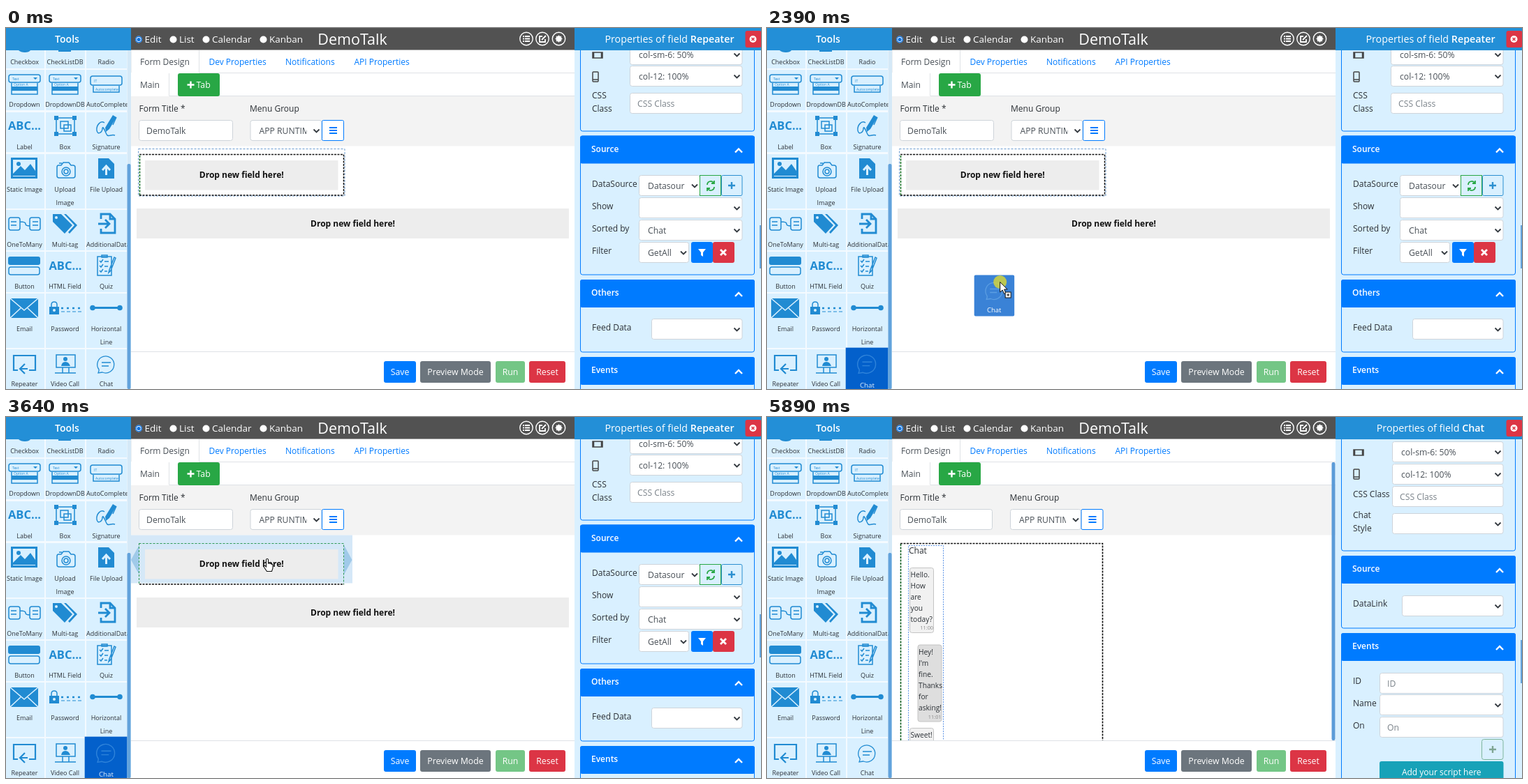
Animation of 1081 by 518 pixels, one loop 6280 ms. Source, as an HTML page:

```html
<!DOCTYPE html>
<html lang="en">
<head>
<meta charset="utf-8">
<title>Form designer</title>
<style>
html, body { margin: 0; width: 100%; height: 100%; overflow: hidden; background: #fff; }
#stage { display: block; width: 1081px; height: 518px; font: 12px "Open Sans", "Noto Sans", sans-serif; fill: #2b3035; }
text { white-space: pre; }
.tile .ink { fill: #218bd2; }
.tile .pen { fill: none; stroke: #218bd2; }
.dark .bg { fill: #0360cb; }
.dark .pen { stroke: #2f83da; }
.dark text { fill: #e4f0fd; }
</style>
</head>
<body>
<svg id="stage" viewBox="0 0 1081 518" xmlns="http://www.w3.org/2000/svg"></svg>
<script>
(() => {
const BLUE = '#007bff', BAR = '#238fd7', PALE = '#d9f0ff', GREEN = '#28a745', RED = '#dc3545';
const LOOP = 6280, STEP = 69;

const rect = (x, y, w, h, fill, more = '') =>
  `<rect x="${x}" y="${y}" width="${w}" height="${h}" fill="${fill}" ${more}/>`;
const text = (x, y, s, more = '') => `<text x="${x}" y="${y}" ${more}>${s}</text>`;
const line = (d, color, width = 1.5, more = '') =>
  `<path d="${d}" fill="none" stroke="${color}" stroke-width="${width}" ${more}/>`;
const group = (id, body, more = '') => `<g id="${id}" ${more}>${body}</g>`;
const mid = 'text-anchor="middle"';
const white = 'fill="#fff"';
const bold = 'font-weight="700"';

const field = (x, y, w, s, color, dx, clip) =>
  rect(x + .5, y + .5, w - 1, 29, '#fff', 'stroke="#ced4da" rx="3"') +
  `<svg x="${x}" y="${y}" width="${w - clip}" height="30">` +
  text(dx, 20, s, `font-size="12.2" fill="${color}"`) + '</svg>';
const input = (x, y, w, s, color = '#7b838a') => field(x, y, w, s, color, 11, 6);
const select = (x, y, w, s = '') => field(x, y, w, s, '#495057', 13, 22) +
  line(`M${x + w - 12} ${y + 13.5}l4 4 4-4`, '#343a40', 1.8);
const button = (x, y, w, h, fill, s = '', size = 12.3) =>
  rect(x, y, w, h, fill, 'rx="3"') + text(x + w / 2, y + h / 2 + 4.5, s, `${mid} ${white} font-size="${size}"`);
const panel = (y, bottom, name) =>
  rect(822.5, y + .5, 249, bottom - y, 'none', `stroke="${BLUE}" rx="3"`) +
  (name ? rect(822, y, 250, 40, BLUE, 'rx="3"') +
    text(838, y + 23, name, `${white} font-weight="600"`) +
    line(`M1044 ${y + 24}l5-5 5 5`, '#fff', 2.4) : '');
const plus = (x, y, r, color) => line(`M${x - r} ${y}h${2 * r}M${x} ${y - r}v${2 * r}`, color, 2.4);

// Tool tiles
const pen = (d, w = 1.5) => `<path class="pen" d="${d}" stroke-width="${w}"/>`;
const ink = d => `<path class="ink" d="${d}"/>`;
const dot = (x, y, r) => `<circle class="ink" cx="${x}" cy="${y}" r="${r}"/>`;
const ring = (x, y, r) => `<circle class="pen" cx="${x}" cy="${y}" r="${r}" stroke-width="1.5"/>`;
const tiny = (x, y, s) => `<text class="ink" x="${x}" y="${y}" font-size="5">${s}</text>`;
const abc = (x, y) => `<text class="ink" x="${x}" y="${y}" font-size="16.5" ${bold} ${mid}>ABC...</text>`;
const pill = (x, y, w, h) => `M${x + 3} ${y}h${w - 6}q3 0 3 3v${h - 6}q0 3-3 3h${6 - w}q-3 0-3-3v${6 - h}q0-3 3-3z`;
const drop = (x, s) => pen(`${pill(x, 67, 45, 11)}M${x + 4} 79v16h37v-16`) +
  ink(`M${x + 4} 84h37v6h-37zM${x + 35} 71h6l-3 3z`) + tiny(x + 5, 75, s) + tiny(x + 7, 83, 'Option A');
const bubbleIcon = y => pen(`M133 ${y}l-1 3 6-1a12 12 0 1 0-5-4zM137 ${y - 12}h13M137 ${y - 7}h10`, 1.3);

const colX = [0, 57, 115], colW = [55, 56, 58], mids = [26.5, 84.5, 143.5];
const rows = [
  [0, 58, 52, [['Checkbox', ink('M18 32h17q-2 3-8 3t-9-3z')], ['CheckListDB', ink('M75 32h18v2h-18z')], ['Radio', '']]],
  [60, 58, 113, [['Dropdown', drop(4, 'Text')], ['DropdownDB', drop(62, 'Text')],
    ['AutoComplete', pen(pill(121, 69, 45, 13) + 'M125 83v9h37v-9') + tiny(126, 78, 'IT') + tiny(128, 90, 'Autocomplete')]]],
  [121, 57, 174, [['Label', abc(26.5, 146)],
    ['Box', pen('M72 129h26v23h-26zM78 134h11v10h-11zM83 139h10v9h-10z') + ink('M69 126h6v6h-6zM95 126h6v6h-6zM69 149h6v6h-6zM95 149h6v6h-6z')],
    ['Signature', ink('M153 125l5 3-10 17-5 4-1-6z') + pen('M158 128l-5 11M141 136c-6-4-12 4-11 11s8 3 8-3c1-5 5 8 7 10 4 2 6-2 11 0')]]],
  [181, 78, 235, [['Static Image', pen('M8.500 187.500h35v27h-35z', 3) + dot(18, 195, 3) + ink('M10 212v-3l11-11 6 6 8-9 7 10v7z')],
    ['Upload|Image', pen('M75 197h4l3-4h8l3 4h3q3 0 3 3v12q0 3-3 3h-20q-3 0-3-3v-12q0-3 2-3zM76 194h4') + ring(86, 206, 6) + ring(86, 206, 3)],
    ['File Upload', ink('M132 187h15l8 8v21h-23z') + line('M143.500 211v-12M138 204l5.500-6 5.500 6', PALE, 3)]]],
  [261, 58, 314, [['OneToMany', pen(pill(4, 272, 16, 18) + pill(34, 272, 15, 18) + 'M7 278h8M7 283h8M38 278h8M38 283h8M20 278q8 0 8 3t6 3')],
    ['Multi-tag', ink('M67 267h12l16 16-11 12-17-17zM83 267h3l16 16-11 12-2-2 9-10z') + `<circle cx="72" cy="272" r="2" fill="${PALE}"/>`],
    ['AdditionalData', pen('M136 274v-7h13l7 7v20h-20v-6M149 267v7h7M132 281h15M142 275l6 6-6 6', 2.8)]]],
  [321, 58, 374, [['Button', ink(pill(3, 328, 46, 12)) + pen(pill(4, 343, 44, 11))],
    ['HTML Field', abc(85, 347)],
    ['Quiz', pen('M131 328h20v27h-20zM137 326h8v3h-8zM134 334l2 2 3-4M134 341l2 2 3-4M134 348l2 2 3-4M141 335h6M141 342h5M141 349h4M155 329l-7 18-1 4 3-3 7-18z')]]],
  [381, 78, 435, [['Email', ink('M6 388h40v28h-40z') + line('M6 388l20 17 20-17M6 416l15-14M46 416l-15-14', PALE, 1.6)],
    ['Password', ink('M62 400h14v11h-14z') + pen('M65 400v-3q0-4 4-4t4 4v3') + line('M79 402h29', '#218bd2', 2.5, 'stroke-dasharray="3 5"') + line('M79 407h29', '#218bd2', 1, 'stroke-dasharray="5 3"') + `<circle cx="69" cy="405" r="2" fill="${PALE}"/>`],
    ['Horizontal|Line', ink('M123 400h41v3h-41z') + dot(124, 401.5, 3.8) + dot(163, 401.5, 3.8)]]],
  [461, 59, 514, [['Repeater', pen('M17 491h-6v-21h31v21h-9M27 482l-7 7 7 7M20 489h11', 2.2)],
    ['Video Call', pen('M72 469h27v18h-27zM77 495h17M81 487v8M90 487v8M70 495h30') + ink('M79 485q1-6 6-6t7 6z') + dot(85, 475, 3)],
    ['Chat', bubbleIcon(492)]]]
];
const tiles = rows.flatMap(([y, h, base, list]) => list.map(([label, icon], c) => {
  const words = label.split('|').map((w, i) => {
    const long = c === 2 && w.length > 11;
    return text(long ? 115 : mids[c], base + i * 19, w, `font-size="9" ${long ? '' : mid}`);
  }).join('');
  const id = label.split('|')[0].replace(/\W/g, '');
  return group(id, rect(colX[c], y, colW[c], h, PALE, 'class="bg"') + icon + words, 'class="tile"');
})).join('');

const sidebar = rect(0, 0, 179, 518, '#f4faff') +
  `<svg width="174" height="518">${tiles}</svg>` +
  rect(173.5, 32, 5.5, 486, '#d5e9f7') + rect(173.5, 195, 5, 323, '#62a3dc', 'rx="2"') +
  rect(0, 0, 179, 32, BAR) + text(87.5, 21, 'Tools', `${mid} ${white} font-size="14" font-weight="600"`);

// Title bar and tabs
const radios = [[190, 'Edit'], [239.5, 'List'], [286.5, 'Calendar'], [368.5, 'Kanban']].map(([x, s], i) =>
  `<circle cx="${x}" cy="16.5" r="5" fill="#fff"/>` +
  (i ? '' : `<circle cx="190" cy="16.5" r="4.2" fill="#fff" stroke="#0a6fdd" stroke-width="1.5"/><circle cx="190" cy="16.5" r="2.6" fill="#0a6fdd"/>`) +
  text(x + 8.5, 21, s, `${white} font-size="13.5"`)).join('');
const rounds = [745, 768, 791.5].map(x => `<circle cx="${x}" cy="15.5" r="9.2" fill="none" stroke="#fff" stroke-width="1.4"/>`).join('') +
  line('M743 12h7M743 15.500h7M743 19h7M740 12h2M740 15.500h2M740 19h2', '#fff', 1.8) +
  line('M768 12h-4v8h8v-4M767 17l6-6', '#fff', 1.8) +
  '<circle cx="791.5" cy="15.5" r="3" fill="none" stroke="#fff" stroke-width="2.4"/>' +
  line('M791.500 10.500v10M786.500 15.500h10M788 12l7 7M788 19l7-7', '#fff', 1.1);
const topBar = rect(179, 0, 635, 31.5, '#525252') + radios + rounds +
  text(496, 24, 'DemoTalk', `${mid} ${white} font-size="21.5" font-weight="500"`) +
  text(192, 52.5, 'Form Design', 'fill="#495057"') +
  [[290.5, 'Dev Properties'], [400, 'Notifications'], [498.5, 'API Properties']].map(([x, s]) => text(x, 52.5, s, `fill="${BLUE}"`)).join('') +
  line('M179 32v32M276.500 32v32.500H814', '#dee2e6', 1) +
  rect(179, 98, 635, 71.5, '#f3f3f3') + line('M233.500 65v32.500H814', '#dee2e6', 1) +
  text(192, 86, 'Main', 'fill="#495057"') + button(246, 65, 60, 33, GREEN) + plus(264.5, 81.5, 5, '#fff') +
  text(272.5, 86, 'Tab', `${white} font-size="12.3"`) + text(190.5, 120, 'Form Title *');
const footer = rect(179, 464, 635, 54, '#fff') + line('M179 464.500H814', '#dee2e6', 1) +
  button(541, 478, 46, 31, BLUE, 'Save') + button(593, 478, 101, 31, '#6c757d', 'Preview Mode') +
  button(701, 478, 42, 31, '#74c686', 'Run') + button(749, 478, 52, 31, RED, 'Reset');

const formHead = (inputW, x, selW) => text(x, 120, 'Menu Group') + input(190, 132, inputW, 'DemoTalk', '#495057') +
  select(x + .5, 132, selW, 'APP RUNTIME') +
  rect(x + selW + .5, 132.5, 31, 29, '#fff', `stroke="${BLUE}" rx="2"`) +
  line(`M${x + selW + 11} 143h11m-11 4h11m-11 4h11`, BLUE, 1.8);
const hint = (x, y, w, h) => rect(x, y, w, h, '#ededed') + text(x + w / 2, y + h / 2 + 4, 'Drop new field here!', `${mid} ${bold} fill="#111"`);

const emptyForm = formHead(135, 349, 103) +
  group('glow', rect(179, 169.5, 317, 69, '#d5e8f8') + '<path d="M190.500 184v42l-11.500-21zM484 184v42l11.500-21z" fill="#a0cae9"/>' +
    line('M190.500 181.500h293v59M190.500 181v59', '#2f9a55', 1, 'stroke-dasharray="3 2"')) +
  group('outline', rect(189.5, 173.5, 295.5, 67.5, 'none', 'stroke="#6a9bd0" stroke-dasharray="3 2"') +
    line('M191.500 240v-58.500', '#0b6b1c', 1.5, 'stroke-dasharray="3 1.5"') +
    line('M191 181.500h292.500v58.500', '#111', 1.5, 'stroke-dasharray="3 1.5"')) +
  line('M191 240h293', '#111', 1.5, 'stroke-dasharray="3 1.5"') +
  hint(199, 190, 276.5, 42.5) + hint(187, 259, 619, 43);

const bubble = (x, y, h, fill, lines, time) => rect(x + .5, y + .5, 34, h, fill, 'stroke="#c4c4c4" rx="3"') +
  lines.split('|').map((s, i) => text(x + 1.5, y + 14 + 16 * i, s, 'font-size="10.2"')).join('') +
  text(x + 34, y + h - 4, time, 'font-size="7.3" text-anchor="end" fill="#888"');
const chatForm = formHead(133, 347.5, 102) +
  rect(808.5, 65, 5, 399, '#5b9bd8', 'rx="2"') +
  line('M191.500 464V181.500', '#0b5b1c', 1.6, 'stroke-dasharray="3 1.5"') +
  line('M191 181.500H480.500V464', '#111', 1.6, 'stroke-dasharray="3 1.5"') +
  line('M202.500 464V184.500H252.500V464', '#5b93e6', 1, 'stroke-dasharray="2 1.5"') +
  group('bubbles', bubble(204, 244.5, 93, '#f1f1f1', 'Hello.|How|are|you|today?', '11:00') +
    bubble(215.5, 355, 110, '#dedede', "Hey!|I'm|fine.|Thanks|for|asking!", '11:01') +
    bubble(204, 474.5, 45, '#f1f1f1', 'Sweet!', '')) +
  group('plain', text(203, 196, 'Chat')) +
  group('edit', rect(201, 179.5, 53, 54, '#d5e7ff', 'rx="3"') +
    rect(203, 181.5, 49, 50, '#fff', 'stroke="#5b93e6" stroke-dasharray="2 1.5"') +
    text(213.5, 202, 'Chat', bold) + line('M241 190v15', '#111', 1) + line('M244 230l6-6M247 230l3-3', '#777', 1));

// Property panels
const phones = y => line(`M840 ${y - 4}h14v8h-14zM841.500 ${y - 4}v8M852.500 ${y - 4}v8`, '#444', 1.5) +
  rect(840, y + 24, 8, 14, 'none', 'stroke="#444" stroke-width="1.5" rx="1"') + line(`M840 ${y + 35}h8`, '#444', 1.5);
const label = (y, s) => text(839, y, s);
const heading = s => rect(814, 0, 267, 32, BAR) +
  text(950, 21, `Properties of field <tspan font-weight="600">${s}</tspan>`, `${mid} ${white} font-size="14.3" font-weight="500"`);
const thumb = y => rect(1079, y, 2, 62, '#62a3dc');

const repeaterProps = panel(20, 147.5) + phones(39) +
  select(893, 23, 161.5, 'col-sm-6: 50%') + select(893, 54, 161.5, 'col-12: 100%') +
  label(101, 'CSS') + label(120, 'Class') + input(893, 93, 161.5, 'CSS Class') +
  panel(154.5, 353.5, 'Source') + label(228, 'DataSource') + select(906, 211, 88, 'Datasour') +
  rect(993.5, 211.5, 30, 29, PALE, `stroke="${GREEN}"`) + rect(1024.5, 211.5, 29.5, 29, PALE, 'stroke="#2b8fd0" rx="2"') +
  line('M1004 225a5 5 0 0 1 9-3M1014 219v4h-4M1014 228a5 5 0 0 1-9 3M1004 234v-4h4', GREEN, 1.8) + plus(1039, 226, 5, '#2b8fd0') +
  label(260, 'Show') + select(906, 243, 148.5) + label(292, 'Sorted by') + select(906, 275, 148.5, 'Chat') +
  label(324, 'Filter') + select(906, 307, 72, 'GetAll') + button(981, 307, 31, 30, BLUE) + button(1012, 307, 31, 30, RED) +
  '<path d="M991 317h11l-4 5v6l-3-2v-4z" fill="#fff"/>' + line('M1023 318l8 8M1031 318l-8 8', '#fff', 2.8) +
  panel(361, 464.5, 'Others') + label(434, 'Feed Data') + select(924, 417, 130.5) +
  panel(472, 560, 'Events') + thumb(283) + heading('Repeater');

const chatProps = panel(20, 191.5) + phones(51) +
  select(895, 35, 159.5, 'col-sm-6: 50%') + select(895, 67, 159.5, 'col-12: 100%') +
  label(115, 'CSS Class') + input(895, 99, 159.5, 'CSS Class') +
  label(145, 'Chat') + label(164, 'Style') + select(895, 138, 159.5) +
  panel(199, 302.5, 'Source') + label(272, 'DataLink') + select(909, 256, 145.5) +
  panel(310, 560, 'Events') + label(383, 'ID') + input(877, 367, 177.5, 'ID') +
  label(415, 'Name') + select(877, 398, 177.5) + label(447, 'On') + input(877, 430, 177.5, 'On') +
  rect(1023.5, 462.5, 30.5, 29, PALE, 'stroke="#7fb59b" rx="3"') + plus(1039, 477, 5, '#7fa593') +
  button(877, 494, 177.5, 31, '#17a2b8', 'Add your script here', 12) + thumb(320) + heading('Chat');

// Pointer parts share a hot spot at 0,0
const pointer = group('spot', '<circle r="9.5" fill="#dcd832" fill-opacity=".8"/>') +
  group('arrow', '<path d="M0 0V14.500L3.500 11.500 6 17 8.300 16 6 10.500H10.500Z" fill="#fff" stroke="#111"/>') +
  group('copy', rect(7.5, 14.5, 8, 8, '#fff', 'stroke="#111"') + line('M9.500 18.500h4M11.500 16.500v4', '#111', 1)) +
  group('hand', '<path d="M-1.500 1.500Q0-1 1.500 1.500V7Q3 5.500 4 7.500 5.500 6.500 6.500 8.500 8 8 8 10V14L6.500 18.500H-.5L-4.500 12.500Q-5.500 10-3.500 10L-1.500 12Z" fill="#fff" stroke="#111" stroke-width="1.1"/>') +
  group('deny', '<circle r="6.5" fill="none" stroke="#26260c" stroke-width="1.8"/>' + line('M-4.600-4.600L4.600 4.600', '#26260c', 1.8));
const ghost = group('ghost', rect(-37, -10, 57.5, 59, '#0360cb', 'rx="2"') +
  `<g transform="translate(-151.500 -467)" class="tile dark">${bubbleIcon(489)}</g>` +
  text(-8.5, 43, 'Chat', `${mid} ${white} font-size="9.5"`), 'opacity=".78"');

document.getElementById('stage').innerHTML = rect(0, 0, 1081, 518, '#fff') + topBar +
  group('emptyForm', emptyForm) + group('chatForm', chatForm) +
  footer + sidebar + rect(814, 0, 267, 518, PALE) + group('repeaterProps', repeaterProps) + group('chatProps', chatProps) +
  rect(1058.5, 4, 23, 24, RED, 'rx="3"') + '<circle cx="1069.5" cy="16" r="5" fill="#fff"/>' +
  line('M1067.500 14l4 4M1071.500 14l-4 4', RED, 1.6) + group('mouse', ghost + pointer);

const el = id => document.getElementById(id);
const show = (id, on) => { el(id).style.display = on ? '' : 'none'; };
const grow = (id, on, cy) => el(id).setAttribute('transform', on ? `translate(144 ${cy}) scale(1.08) translate(-144 ${-cy})` : 'scale(1)');

// time, x, y of the pointer
const route = [
  [520, 843, 414], [1140, 240, 484], [1417, 161, 462], [1760, 149, 468], [1820, 149, 468], [2038, 193, 465],
  [2450, 361, 345], [2728, 385, 248], [3073, 375, 202], [3290, 374, 199], [3500, 374, 199], [3556, 374, 203],
  [4170, 374, 203], [4520, 621, 399], [4800, 464, 174], [5143, 1050, 499]
];
function at(t) {
  const i = route.findIndex(k => k[0] > t);
  if (i < 0) return route[route.length - 1].slice(1);
  if (i === 0) return route[0].slice(1);
  const [a, b] = [route[i - 1], route[i]], f = (t - a[0]) / (b[0] - a[0]);
  return [a[1] + (b[1] - a[1]) * f, a[2] + (b[2] - a[2]) * f];
}

function draw(t) {
  const within = (a, b) => t >= a && t < b;
  const [x, y] = at(520 + Math.floor((t - 520) / STEP) * STEP);
  const drag = within(1840, 3570), carry = within(2170, 3570), done = t >= 3840, edited = t >= 5820;
  const hand = within(1340, 1840) || within(3570, 4250) || within(5150, 5890);
  el('mouse').setAttribute('transform', `translate(${x} ${y})`);
  show('mouse', within(520, 5890));
  show('ghost', carry);
  show('spot', within(1700, 3570));
  show('copy', carry);
  show('deny', drag && !carry);
  show('hand', hand);
  show('arrow', !hand && (!drag || carry));
  grow('Horizontal', within(1340, 1490), 420);
  grow('Chat', within(1490, 3840), 490);
  el('Chat').classList.toggle('dark', within(1840, 3840));
  show('glow', within(2800, 3840));
  show('outline', !within(2800, 3840));
  show('emptyForm', !done);
  show('chatForm', done);
  show('repeaterProps', t < 3910);
  show('chatProps', t >= 3910);
  show('edit', !edited);
  show('plain', edited);
  el('bubbles').setAttribute('transform', `translate(0 ${edited ? -28.5 : 0})`);
}

const start = performance.now();
function tick() {
  draw((performance.now() - start) % LOOP);
  requestAnimationFrame(tick);
}
tick();
})();
</script>
</body>
</html>
```
